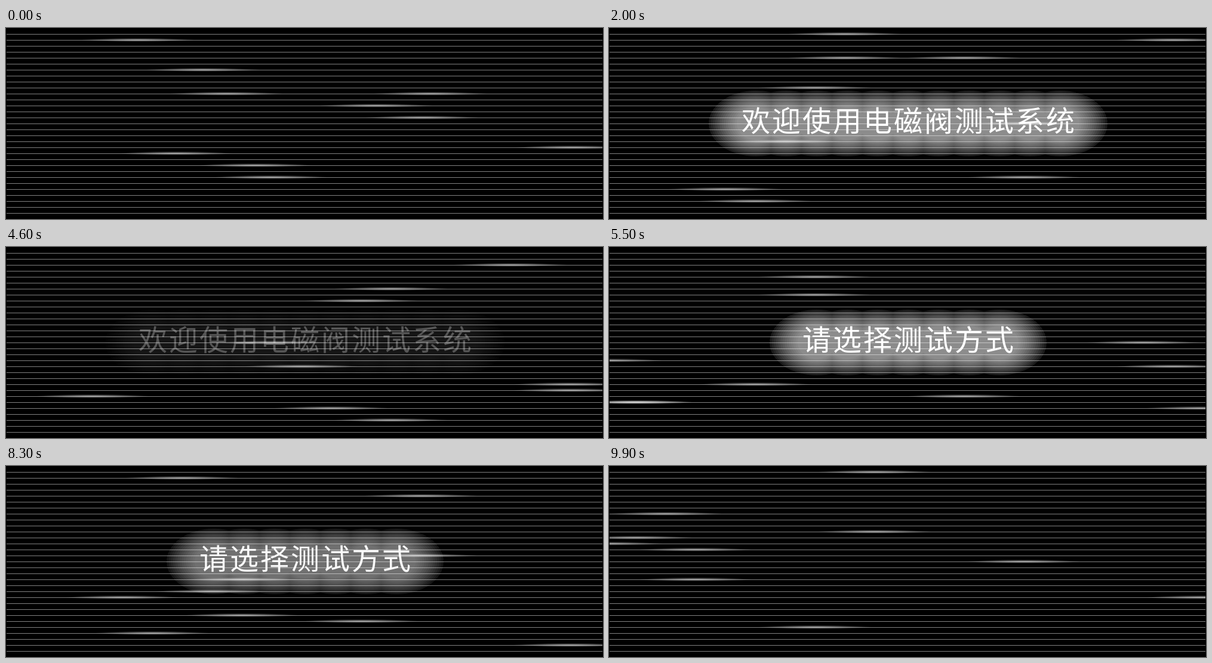
An HTML page for the animation above (10 s loop, 1000 by 320 pixels).

```html
<!DOCTYPE html>
<html lang="zh">
<head>
<meta charset="utf-8">
<title>欢迎</title>
<style>
html, body { margin: 0; width: 100%; height: 100%; overflow: hidden; background: #000; }
svg { display: block; width: 100vw; height: 100vh; }
text { font: 300 48px "Noto Sans CJK SC", "Noto Sans CJK", serif; letter-spacing: 3px; fill: #fff; }
</style>
</head>
<body>
<svg viewBox="0 0 1000 320">
  <defs>
    <radialGradient id="shine">
      <stop offset="0" stop-color="#fff" stop-opacity=".6"/>
      <stop offset="1" stop-color="#fff" stop-opacity="0"/>
    </radialGradient>
    <clipPath id="frame"><rect x="1" width="998" height="320"/></clipPath>
  </defs>
  <rect width="1000" height="320"/>
  <path id="lines" stroke="#808080" fill="none"/>
  <g id="streaks" clip-path="url(#frame)"></g>
  <g id="captions"></g>
</svg>
<script>
const TICK = 100, TICKS = 100, HALF = 50;
const STEP = 50, ENTRY = -5, EXIT = 996, LAP = 21;
const PITCH = 51, RINGS = 14;

// Start position, then the row used on each successive pass.
const STREAKS = [
  [221, 2, 27, 16, 2, 22],
  [284.5, 21, 29, 20, 16, 28, 13],
  [330, 7, 19, 27, 23, 2, 12],
  [369, 11, 10, 9, 19, 21, 8],
  [418, 23, 1, 7, 26, 19, 14],
  [444, 25, 5, 29, 26, 25, 19],
  [620, 13, 5, 3, 23, 26, 27],
  [697, 15, 25, 23, 5, 5, 1],
  [711, 11, 16, 24, 8, 15, 11],
  [949, 20, 2, 3, 25, 30, 16]
];

const $ = id => document.getElementById(id);

function add(parent, tag, attrs) {
  const el = document.createElementNS("http://www.w3.org/2000/svg", tag);
  for (const k in attrs) el.setAttribute(k, attrs[k]);
  return parent.appendChild(el);
}

function makeCaption(str, left) {
  const root = add($("captions"), "g", {});
  const glow = add(root, "g", {});
  for (let k = 0; k < RINGS; k++) {
    const ring = add(glow, "g", { opacity: k ? 0.05 : 0.1, fill: "#fff" });
    for (let i = 0; i < str.length; i++) {
      add(ring, "ellipse", {
        cx: left + 24 + i * PITCH, cy: 160,
        rx: 79 - 3.6 * k, ry: 55 - 2.1 * k
      });
    }
  }
  const label = add(root, "text", { x: left, y: 173 });
  label.textContent = str;
  return { root, glow, label };
}

let rows = "";
for (let y = 10; y <= 310; y += 10) rows += `M1 ${y + 0.5}H999`;
$("lines").setAttribute("d", rows);

const streaks = STREAKS.map(([start, ...lanes]) => ({
  start, lanes,
  first: Math.ceil((EXIT - start) / STEP),
  el: add($("streaks"), "ellipse", { rx: 96, ry: 3.2, fill: "url(#shine)" })
}));

const captions = [
  makeCaption("欢迎使用电磁阀测试系统", 222),
  makeCaption("请选择测试方式", 324)
];

function fade(t) {
  return Math.max(0, Math.min(1, t / 5, (49 - t) / 20));
}

function draw(n) {
  for (const { start, lanes, first, el } of streaks) {
    const since = n - first;
    const pass = since < 0 ? 0 : 1 + Math.floor(since / LAP);
    const x = since < 0 ? start + n * STEP : ENTRY + (since % LAP) * STEP;
    el.setAttribute("cx", x);
    el.setAttribute("cy", lanes[pass] * 10);
  }
  captions.forEach(({ root, glow, label }, i) => {
    const active = Math.floor(n / HALF) === i;
    const a = active ? fade(n % HALF) : 0;
    root.setAttribute("visibility", a ? "visible" : "hidden");
    glow.setAttribute("opacity", a);
    label.setAttribute("opacity", 1 - (1 - a) ** 2);
  });
}

const begin = performance.now();
function loop() {
  draw(Math.floor((performance.now() - begin) / TICK) % TICKS);
  requestAnimationFrame(loop);
}
loop();
</script>
</body>
</html>
```
